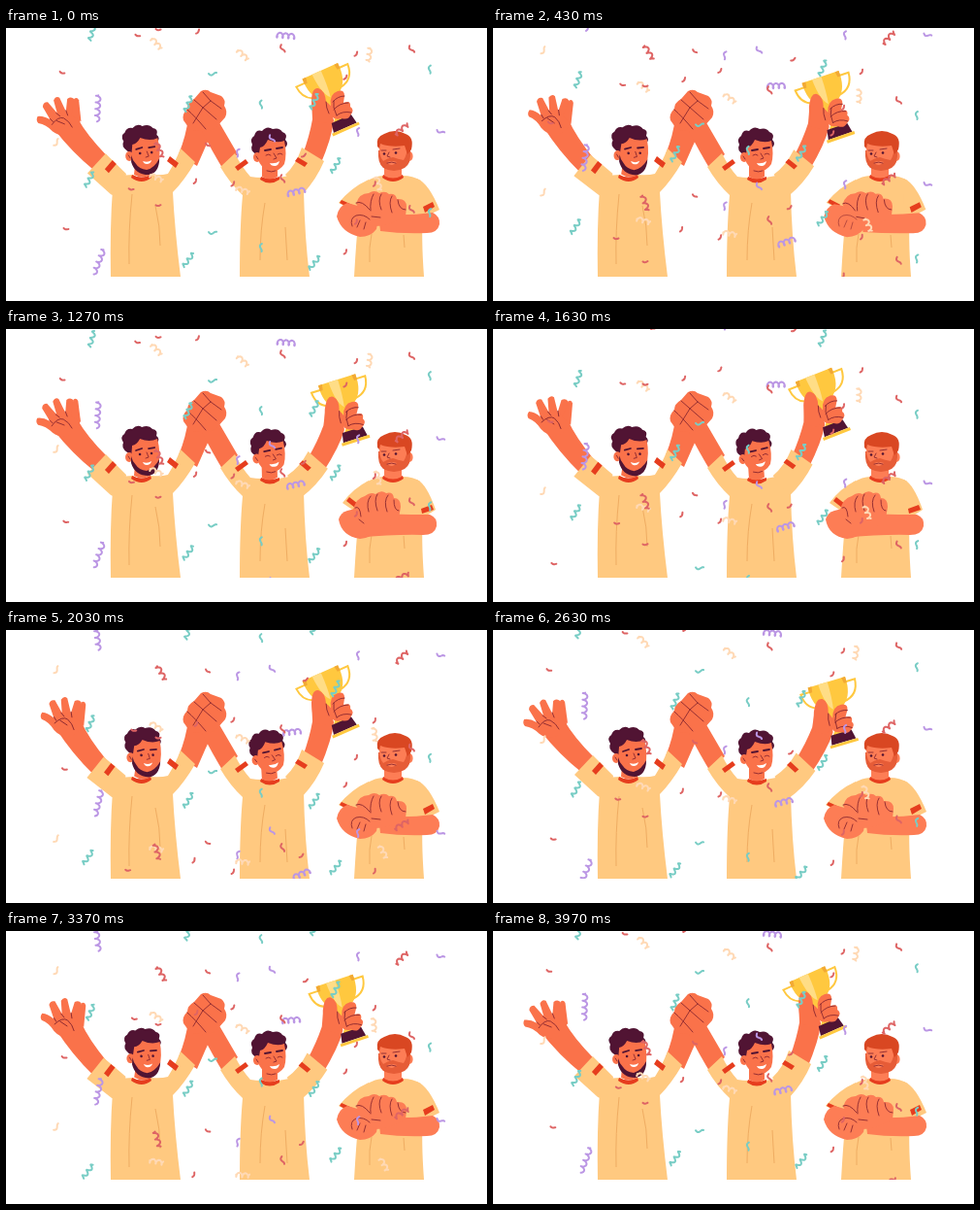
Animation, 496 px wide and 281 px high, one loop 4010 ms. Source, as an HTML page:

```html
<!DOCTYPE html>
<html lang="en">
<head>
<meta charset="utf-8">
<title>Team celebration</title>
<style>
  html, body { margin: 0; width: 100%; height: 100%; overflow: hidden; background: #fff; }
  svg { display: block; width: 100%; height: 100%; }
  .shirt { fill: #ffc980; }
  .fold { fill: none; stroke: #efac62; stroke-width: 1; }
  .trim { fill: #e63d1e; }
  .skin { fill: #fa724a; }
  .skin3 { fill: #fd7d55; }
  .hair { fill: #511433; }
  .ginger { fill: #d94722; }
  .beard { fill: #e65c37; }
  .ink { fill: none; stroke: #8c2930; stroke-width: .9; stroke-linecap: round; stroke-linejoin: round; }
  .brow { fill: none; stroke: #511433; stroke-width: 1.8; stroke-linecap: round; }
  .eye { fill: #511433; }
  .gold { fill: #ffc83f; }
  .bits { fill: none; stroke-width: 2; stroke-linecap: round; stroke-linejoin: round; }
</style>
</head>
<body>
<svg viewBox="0 0 496 281" xmlns="http://www.w3.org/2000/svg">
  <defs><clipPath id="floor"><rect width="496" height="256"/></clipPath></defs>
  <g clip-path="url(#floor)">

    <!-- waving player -->
    <g id="waveArm">
      <g id="waveFore">
        <path class="skin" d="M49 104L74 94Q83 110 104 131L92 147Q68 128 49 104Z"/>
        <g id="waveHand">
          <path class="skin" d="M48 107Q41 100 33 99Q30 96 32 92Q38 91 45 95L37 82Q37 77 42 77L52 88L48 75Q50 70 54 72L61 86L62 73Q66 70 69 73L72 85Q78 93 75 101L69 108Q58 114 48 107Z"/>
          <path class="skin" d="M67 90L69 73Q72 70 74 74L77 96Z"/>
          <path class="ink" d="M47 100Q53 91 59 93Q65 96 68 102M52 96L60 99M51 88L55 91M61 85L63 90M45 94L48 97"/>
        </g>
      </g>
      <path class="shirt" d="M84 149L103 129L124 150L120 176L108 171Z"/>
      <path class="trim" d="M102 145L110 136L114 140L106 149Z"/>
    </g>
    <path class="skin" d="M178 130Q186 110 188 92L215 102Q206 121 197 142Z"/>
    <path class="shirt" d="M116 153Q123 151 131 151Q140 158 149 151Q160 152 167 150Q174 139 180 124L195 138Q184 157 172 169Q174 208 180 256H108Q107 206 110 165Z"/>
    <path class="trim" d="M169 132L178 139L175 144L166 137ZM130 151Q140 156 149 151L150 154Q140 162 129 154Z"/>
    <path class="fold" d="M130 171Q126 210 127 243M154 183Q159 204 159 224"/>
    <g id="head1">
      <path class="skin" d="M133 140H149V151Q141 156 132 151Z"/>
      <path class="hair" d="M125 127Q118 122 121 117Q117 111 122 108Q124 102 130 103Q135 98 140 101Q147 98 151 103Q157 104 155 110Q159 113 156 117L133 122L130 130Z"/>
      <ellipse class="skin" cx="127" cy="132" rx="4" ry="5"/>
      <path class="skin" d="M130 120Q135 119 138 113Q148 117 156 113Q160 128 157 140Q151 151 140 148Q130 143 129 133Z"/>
      <path class="hair" d="M129 131Q130 136 134 140Q137 145 145 146Q153 144 158 134Q158 149 147 151Q133 151 129 138Z"/>
      <path fill="#fff" d="M141 137Q146 139 150 136Q149 140 145 140Q142 140 141 137Z"/>
      <path class="brow" d="M134 125L140 123M147 123L153 122"/>
      <circle class="eye" cx="138" cy="129" r="1.3"/><circle class="eye" cx="150" cy="128" r="1.3"/>
      <path class="ink" d="M145 127L147 132L144 133M126 131L128 134"/>
    </g>

    <!-- trophy player -->
    <path class="skin" d="M202 106L218 94L239 130L223 144Q211 124 202 106Z"/>
    <path class="skin" d="M183 95Q181 89 187 83Q187 77 194 73L201 65Q207 62 211 66L222 70Q227 74 225 80Q229 86 226 92L217 102Q209 109 203 105Q193 108 188 102Z"/>
    <path class="ink" d="M187 84Q195 91 206 104M194 74L217 94M193 98L203 82M203 66L211 75L222 83M211 75L203 82"/>
    <path class="shirt" d="M221 143L236 129Q243 143 252 153Q258 154 263 154Q272 160 281 154L297 151L307 168Q308 215 313 256H241Q241 205 244 172Q231 160 221 143Z"/>
    <path class="trim" d="M236 143L247 135L250 139L239 147ZM263 153Q272 157 282 153L282 156Q272 163 262 156Z"/>
    <path class="fold" d="M267 180Q262 208 262 239M288 205L290 239"/>
    <g id="cupArm">
      <path class="skin" d="M306 130Q313 111 316 94L315 74L332 72L338 95Q336 113 324 141Z"/>
      <g id="cupHold">
        <g transform="translate(325 47) rotate(-24)">
          <path d="M-18 2H-29Q-28 19 -12 21M18 2H29Q28 19 12 21" fill="none" stroke="#ffc83f" stroke-width="2"/>
          <path class="gold" d="M-20 -3H20Q21 16 11 24Q4 29 3 43L9 52H-9L-3 43Q-4 29 -11 24Q-21 16 -20 -3Z"/>
          <path fill="#ffdd86" d="M-9 -3H1Q1 14 -1 26Q-8 20 -9 -3Z"/>
          <path fill="#f2a934" d="M-20 -3H-16L-17 3H-20ZM16 -3H20V3H17Z"/>
          <path class="hair" d="M-11 51H11L13 61H-13Z"/>
          <path class="gold" d="M-15 61H15V64H-15Z"/>
        </g>
        <path class="skin" d="M315 76Q315 61 322 62Q329 64 330 76L335 80Q333 68 342 65Q349 63 349 70L348 77Q356 74 355 81Q360 84 355 90Q353 95 346 93Q339 95 336 91L330 98L317 96Z"/>
        <path class="ink" d="M330 76Q330 82 333 88M337 76Q342 70 349 70M338 84Q344 77 353 77M341 90Q347 85 356 87M338 75V82L341 90"/>
      </g>
      <path class="shirt" d="M288 151Q299 141 305 123L328 137Q320 156 306 171Z"/>
      <path class="trim" d="M301 133L311 139L308 143L298 137Z"/>
    </g>
    <g id="head2">
      <path class="skin" d="M264 140H280V153Q272 158 264 153Z"/>
      <path class="hair" d="M258 130Q251 126 254 120Q251 114 256 111Q258 104 264 106Q269 100 275 104Q282 102 285 107Q291 109 288 115Q292 119 288 123L268 125L264 133Z"/>
      <ellipse class="skin" cx="259" cy="133" rx="4" ry="5"/>
      <path class="skin" d="M262 123Q267 122 270 115Q280 119 287 116Q290 130 287 140Q281 149 271 147Q262 143 260 135Z"/>
      <path class="brow" d="M267 126L273 125M279 124L285 123"/>
      <path class="ink" d="M268 131Q271 129 273 131M280 130Q283 128 285 130M276 129L279 134L276 135M258 132L260 135M269 147Q274 149 278 147"/>
      <path fill="#fff" d="M272 139Q278 140 282 137Q281 142 277 142Q273 142 272 139Z"/>
    </g>

    <!-- player with folded arms -->
    <path class="shirt" d="M371 158Q381 152 389 152Q399 157 409 152Q420 152 427 157L430 190Q428 215 431 256H359Q361 220 364 190Z"/>
    <path class="shirt" id="sleeveL"/>
    <path class="shirt" id="sleeveR"/>
    <path class="trim" id="stripeL"/>
    <path class="trim" id="stripeR"/>
    <path class="trim" d="M389 151Q399 156 409 151L410 154Q399 162 388 154Z"/>
    <path class="fold" d="M377 212Q374 226 375 241M410 213L411 226"/>
    <path class="skin3" id="foreR"/>
    <path class="skin3" id="foreL"/>
    <path class="skin3" id="palm"/>
    <path class="ink" id="knuckles"/>
    <path class="ink" id="fistLines" d="M357 204Q354 196 361 193Q369 191 375 197M362 205L365 198M369 207L371 200"/>
    <path class="skin3" d="M390 140H408V152Q399 157 390 152Z"/>
    <ellipse class="skin3" cx="416" cy="132" rx="3.6" ry="5"/>
    <path class="beard" d="M384 126H417Q418 140 411 144Q400 150 389 144Q383 139 384 126Z"/>
    <path class="skin3" d="M385 118H414Q414 130 410 136Q404 135 399 133Q393 134 389 137Q384 131 385 118Z"/>
    <path class="skin3" d="M393 138Q398 136 403 138Q401 141 398 141Q394 141 393 138Z"/>
    <path class="ginger" d="M383 122Q381 112 390 109Q401 103 412 109Q421 112 418 125L414 130L411 121Q396 123 386 119L385 124Z"/>
    <path class="ink" d="M387 126L392 126M399 125L406 124M395 128L393 132L396 133M393 139Q398 137 402 139"/>
    <circle class="eye" cx="390" cy="129.500" r="1.3"/><circle class="eye" cx="402" cy="128.500" r="1.3"/>

    <g id="confetti" class="bits"></g>
  </g>
</svg>
<script>
const LOOP = 4010;
const STARTS = [580, 2030, 3370];
const LEAD = 700;
const $ = id => document.getElementById(id);
const mod = (a, n) => ((a % n) + n) % n;
const clamp = v => Math.max(0, Math.min(1, v));
const smooth = v => { v = clamp(v); return v * v * (3 - 2 * v); };
const ramp = (t, a, b) => smooth((t - a) / (b - a));

// Ribbon kinds: length, swing, turns, curl along the axis, spin in degrees per second
const KINDS = {
  tick: { len: 5, swing: .7, turns: .6, curl: 0, spin: -6 },
  bow:  { len: 8, swing: 1.5, turns: .8, curl: 0, spin: 4 },
  wave: { len: 18, swing: 2, turns: 2.6, curl: .6, spin: 10 },
  curl: { len: 18, swing: 2.2, turns: 2.6, curl: 1, spin: 10 },
  loop: { len: 16, swing: 2.2, turns: 2.6, curl: 1.2, spin: -18 },
  coil: { len: 27, swing: 2.4, turns: 4, curl: 1.2, spin: 14 },
  roll: { len: 20, swing: 2.6, turns: 3.4, curl: 1.5, spin: -14 }
};

// Each piece: kind, x, y at the start of a fall, speed in px/s, angle, sideways drift in px/s
const PIECES = {
  '#78cdc5': [
    ['wave', 90, -68, 113, 100, -2], ['wave', 188, 1, 120, 108], ['bow', 213, -31, 122, 0],
    ['bow', 263, 8, 110, 95], ['wave', 318, -4, 124, 110], ['wave', 340, 60, 127, 116],
    ['bow', 437, -28, 110, 100]
  ],
  '#bb96e4': [
    ['coil', 94, 6, 118, 84, 1], ['bow', 239, 47, 127, 112], ['bow', 274, 40, 115, 60],
    ['roll', 283, -69, 120, 14, 8], ['bow', 363, 26, 126, 105], ['bow', 448, 26, 126, 25]
  ],
  '#ffd9b5': [
    ['bow', 52, 41, 120, -50], ['loop', 155, -50, 103, 60], ['loop', 244, -39, 104, 55],
    ['loop', 370, -36, 99, 110, 7]
  ],
  '#de6464': [
    ['tick', 56, -31, 120, 28, 3], ['curl', 160, 44, 127, 60, -3], ['tick', 139, -68, 118, 25, -5],
    ['tick', 157, -85, 135, 15], ['tick', 199, -70, 115, -45, -2], ['tick', 208, 42, 122, 40],
    ['tick', 234, -93, 128, -40], ['bow', 285, -43, 100, 70], ['tick', 309, 51, 125, -28, -3],
    ['tick', 350, -35, 134, -45], ['tick', 361, -56, 129, -50], ['tick', 380, -91, 127, -50],
    ['curl', 408, 28, 119, -45], ['bow', 418, -57, 123, 60]
  ]
};

function ribbon({ len, swing, turns, curl }) {
  const steps = Math.ceil(turns * 12);
  const points = Array.from({ length: steps + 1 }, (_, i) => {
    const k = i / steps, a = k * turns * 2 * Math.PI;
    return ((k - .5) * len + curl * Math.cos(a)).toFixed(2) + ' ' + (swing * Math.sin(a)).toFixed(2);
  });
  return 'M' + points.join('L');
}

const falling = [];
for (const [color, list] of Object.entries(PIECES))
  for (const [kind, x, y, speed, angle, drift = 0] of list)
    for (const start of STARTS) {
      const node = document.createElementNS('http://www.w3.org/2000/svg', 'path');
      node.setAttribute('d', ribbon(KINDS[kind]));
      node.setAttribute('stroke', color);
      $('confetti').append(node);
      falling.push({ node, x, y, speed, angle, drift, start, spin: KINDS[kind].spin });
    }

// Folded arms: shapes with the arms spread and drawn in
const FOLDED = {
  sleeveL: ['M374 156Q356 164 343 180L358 188L372 184Z', 'M374 156Q358 164 347 179L360 188L372 184Z'],
  sleeveR: ['M424 155Q436 160 447 187L431 195L424 184Z', 'M424 155Q434 160 443 186L429 195L423 184Z'],
  stripeL: ['M346 177L357 182L355 186L344 180Z', 'M354 173L363 180L360 184L351 177Z'],
  stripeR: ['M430 184L440 179L442 184L432 190Z', 'M428 185L439 181L441 186L429 190Z'],
  foreR: ['M384 191Q410 194 440 190Q448 194 447 202Q445 211 434 211Q408 212 386 209Z',
          'M352 189Q400 191 437 191Q445 194 444 203Q442 212 430 212Q404 211 360 215Z'],
  foreL: ['M341 194Q343 183 352 180L377 187Q386 195 382 207Q376 215 365 215Q346 211 341 194Z',
          'M343 196Q345 189 352 187L372 182Q384 190 386 204Q378 215 365 216Q346 213 343 196Z'],
  palm: ['M361 181Q364 170 374 170Q380 166 385 170Q391 167 395 171Q402 170 403 176Q413 175 413 184L412 194Q394 205 378 204Z',
         'M358 186Q361 174 370 172Q376 167 381 170Q387 165 392 169Q399 167 400 174Q407 174 407 183L405 195Q392 211 372 213Z'],
  knuckles: ['M361 180Q367 177 375 187M376 188Q375 178 379 171M387 187Q383 177 387 171M398 190Q394 179 398 173M412 187Q405 187 404 177M377 194L386 195',
             'M360 184Q365 181 366 193M374 188Q371 178 376 172M383 187Q379 176 383 170M393 188Q389 177 394 171M405 187Q400 187 400 176M364 196L369 200']
};

function blend([from, to], k) {
  const ends = to.match(/[\d.]+/g);
  let i = 0;
  return from.replace(/[\d.]+/g, n => (+n + (ends[i++] - n) * k).toFixed(2));
}

const turn = (id, deg, x, y, dx = 0, dy = 0) =>
  $(id).setAttribute('transform', `translate(${dx} ${dy}) rotate(${deg} ${x} ${y})`);

function waveAt(t) {
  const at = mod(t - STARTS[0], LOOP) + STARTS[0];
  const edges = [...STARTS, STARTS[0] + LOOP];
  const i = edges.findIndex((s, n) => at >= s && at < edges[n + 1]);
  const part = (at - edges[i]) / (edges[i + 1] - edges[i]);
  return smooth(.5 - .5 * Math.cos(2 * Math.PI * (part - .37)));
}

function draw(t) {
  for (const p of falling) {
    const age = (mod(t - p.start + LEAD, LOOP) - LEAD) / 1000;
    const x = p.x + p.drift * age, y = p.y + p.speed * age;
    p.node.style.display = y > -20 && y < 276 ? '' : 'none';
    p.node.setAttribute('transform', `translate(${x.toFixed(2)} ${y.toFixed(2)}) rotate(${p.angle + p.spin * age})`);
  }

  const wave = waveAt(t);
  turn('waveArm', -5 * wave, 120, 158);
  turn('waveFore', 11 * wave, 95, 142);
  turn('waveHand', 8 * wave, 60, 98);
  turn('head1', 4 * wave, 141, 153);
  turn('head2', -4 * (ramp(t, 1000, 1600) - ramp(t, 2080, 2600)), 272, 154);

  const half = t % (LOOP / 2);
  const lift = ramp(half, 0, 720) - ramp(half, 1000, 2005);
  turn('cupArm', 12 * lift, 308, 142, 4 * lift, 4 * lift);
  turn('cupHold', -4 * lift, 340, 85);

  const fold = ramp(t, 300, 800) - ramp(t, 1650, 2000);
  for (const id in FOLDED) $(id).setAttribute('d', blend(FOLDED[id], fold));
  $('fistLines').style.opacity = clamp(1 - 2 * fold);
}

const begin = performance.now();
function tick() {
  draw((performance.now() - begin) % LOOP);
  requestAnimationFrame(tick);
}
tick();
</script>
</body>
</html>
```
